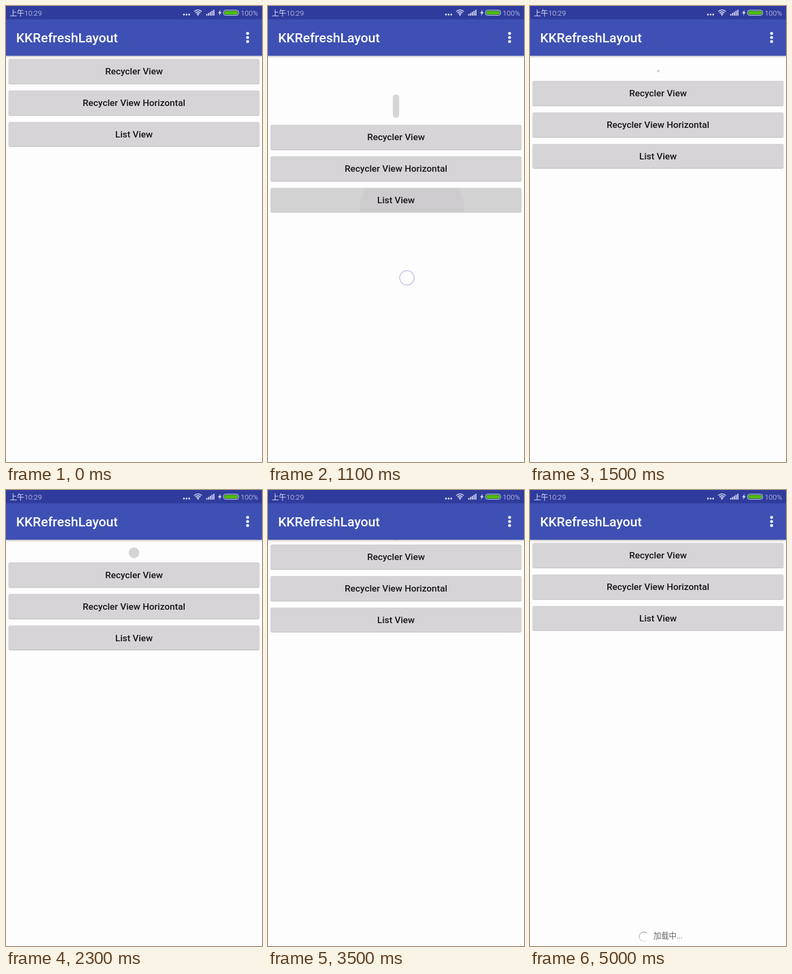
An HTML page that plays this animation: 480x853 px, repeating every 5100 ms.

```html
<!DOCTYPE html>
<html lang="zh">
<head>
<meta charset="utf-8">
<title>KKRefreshLayout</title>
<style>
  html, body { margin: 0; width: 100%; height: 100%; overflow: hidden; }
  body { position: relative; background: #fefdfe; font-family: Roboto, "Noto Sans CJK SC", "Noto Sans CJK", sans-serif; }
  body > *, #list > * { position: absolute; }
  #list { left: 0; top: 0; width: 480px; height: 300px; }
  .button {
    left: 5px; width: 470px; height: 45.7px; border-radius: 2.5px;
    background: #d6d4d6; box-shadow: 0 1px 2px rgba(0, 0, 0, .32);
    color: #18171a; font-weight: 500; font-size: 17.25px; line-height: 47px; text-align: center;
  }
  #pill { background: #d6d4d6; }
  #bar { left: 0; top: 0; width: 480px; height: 93px; background: #3f50b4; box-shadow: 0 1px 4px rgba(0, 0, 0, .38); }
  #status { left: 0; top: 0; width: 480px; height: 24.5px; background: #303c9d; }
  .small { top: 3px; line-height: 20px; font-size: 13.6px; font-weight: 300; color: #dfe2f5; white-space: nowrap; }
  #title { left: 19px; top: 45px; line-height: 30px; font-size: 24.64px; font-weight: 500; color: #fff; }
  #icons { left: 0; top: 0; }
  #touch {
    left: -14.5px; top: -14.5px; width: 29px; height: 29px; box-sizing: border-box;
    border: 2px solid #cccbe5; border-radius: 50%; background: rgba(255, 255, 255, .5);
  }
  #footer { left: 0; top: 820px; width: 480px; height: 30px; }
  #footer > * { position: absolute; }
  #spinner {
    left: 203.5px; top: 5.5px; width: 19px; height: 19px; border-radius: 50%;
    background: conic-gradient(from 135deg, rgba(130, 130, 130, .1), rgba(130, 130, 130, .9) 270deg, transparent 270deg);
    -webkit-mask: radial-gradient(closest-side, transparent 82%, #000 86%);
    mask: radial-gradient(closest-side, transparent 82%, #000 86%);
  }
  #loading { left: 231.5px; line-height: 30px; font-size: 14.4px; color: #666; white-space: nowrap; }
</style>
</head>
<body>
<div id="list">
  <div id="pill"></div>
  <div class="button" style="top:99.3px">Recycler View</div>
  <div class="button" style="top:158px">Recycler View Horizontal</div>
  <div class="button" id="pressed" style="top:216.7px">List View</div>
</div>
<div id="bar"></div>
<div id="status"></div>
<div id="title">KKRefreshLayout</div>
<div class="small" style="left:7px">上午10:29</div>
<div class="small" style="left:440px">100%</div>
<svg id="icons" width="480" height="93" fill="#e3e6f7">
  <circle cx="333.7" cy="16" r="1.7"/><circle cx="338.6" cy="16" r="1.7"/><circle cx="343.5" cy="16" r="1.7"/>
  <g fill="none" stroke="#e3e6f7" stroke-width="1.6">
    <path d="M352.8 10.5Q360 4 367.2 10.5M355.2 13Q360 8.6 364.8 13M357.5 15.3Q360 13 362.5 15.3"/>
  </g>
  <circle cx="360" cy="16.9" r="1.2"/>
  <path d="M375.5 15h2v3h-2zM378.8 13h2v5h-2zM382.1 11h2v7h-2zM385.4 9h2v9h-2zM388.7 7h2v11h-2z"/>
  <path d="M402.5 7L397.7 13.4H400.6L399.5 18L404.3 11.6H401.3Z"/>
  <rect x="407.8" y="7.7" width="28.4" height="9.8" rx="4" fill="#303c9d" stroke="#e3e6f7"/>
  <rect x="409.3" y="9.2" width="25.4" height="6.8" rx="2.7" fill="#4fbd08"/>
  <g fill="#fff"><circle cx="453" cy="51.3" r="2.7"/><circle cx="453" cy="58.9" r="2.7"/><circle cx="453" cy="66.5" r="2.7"/></g>
</svg>
<div id="touch"></div>
<div id="footer"><div id="spinner"></div><div id="loading">加载中...</div></div>
<script>
const LOOP = 5100, STEP = 100, REST = 36.5;
const el = id => document.getElementById(id);
const [list, pill, pressed, touch, footer, spinner] =
  ['list', 'pill', 'pressed', 'touch', 'footer', 'spinner'].map(el);

// One value per step, starting at the given time; the ends are held.
const track = (start, values) => t =>
  values[Math.max(0, Math.min(values.length - 1, (t - start) / STEP))];

const touchX = track(700, [287, 284, 277, 268, 260, 258]);
const touchY = track(700, [240, 265, 335, 425, 508, 531]);
const settle = track(1300, [110, 62, 41, 37, REST]);
const retract = track(3100, [REST, 34, 22, 10, 3, 0]);
const lift = track(700, [0, .5, 1, .6, 0]);
const ripple = track(900, [0, 45, 99, 150]);

function offset(t) {
  if (t < 700) return 0;
  if (t < 1300) return Math.max(0, (touchY(t) - 261.5) / 2);
  return t < 3100 ? settle(t) : retract(t);
}

function drawPill(t) {
  let w = 12, h = 44, bottom = 86.3;
  if (t >= 1500) {
    w = h = 10 + 10 * Math.cos(2 * Math.PI * (t - 2300) / 600);
    bottom = 80.5 + h / 2;
  } else if (t >= 1300) h = t < 1400 ? 30 : 14;
  pill.style.cssText = `left:${240 - w / 2}px;top:${bottom - h}px;width:${w}px;height:${h}px;border-radius:${w / 2}px`;
}

function drawPress(t) {
  const s = pressed.style, k = lift(t), r = ripple(t);
  s.boxShadow = k ? `0 ${1 + k}px ${2 + 4 * k}px rgba(0,0,0,${.32 + .1 * k})` : '';
  if (t < 800 || t > 1200) s.background = '';
  else if (t < 1000) s.background = '#d2d0d2';
  else s.background = `radial-gradient(circle at 265px 47px, #cecbce ${r - 1}px, #d1d2d1 ${r}px)`;
}

function draw(now) {
  const t = Math.floor(now % LOOP / STEP) * STEP;
  list.style.transform = `translateY(${offset(t)}px)`;
  drawPill(t);
  drawPress(t);
  touch.hidden = t < 700 || t >= 1300;
  touch.style.transform = `translate(${touchX(t)}px, ${touchY(t)}px)`;
  footer.hidden = t < 3900;
  spinner.style.transform = `rotate(${(t - 5000) * .36}deg)`;
}

const begin = performance.now();
function tick() {
  draw(performance.now() - begin);
  requestAnimationFrame(tick);
}
tick();
</script>
</body>
</html>
```
